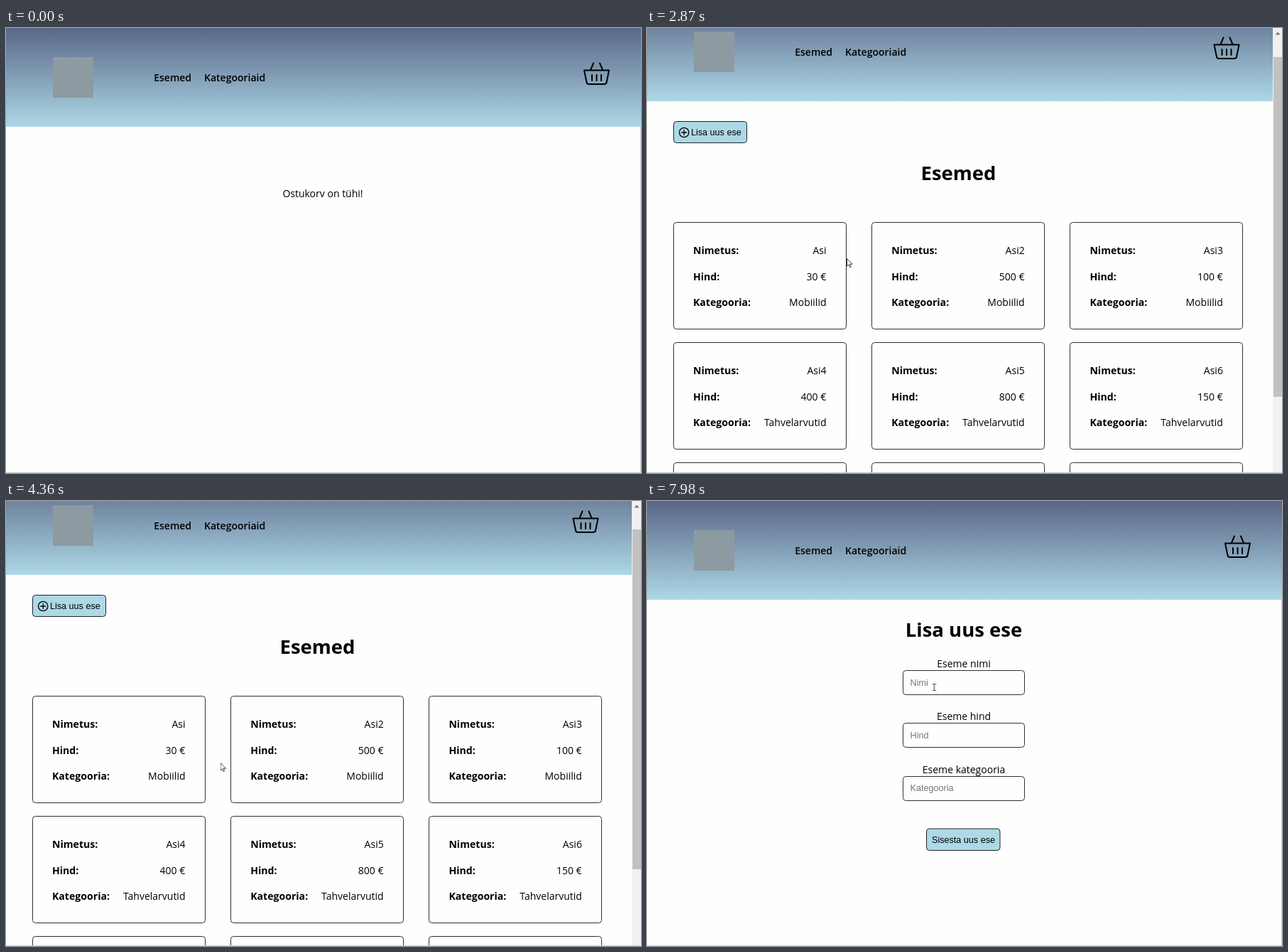
An HTML page that plays this animation: 894x626 px, repeating every 8000 ms.

```html
<!DOCTYPE html>
<html lang="et">
<head>
<meta charset="utf-8">
<title>Esemed</title>
<style>
html, body { margin: 0; width: 100%; height: 100%; overflow: hidden; background: #fefefe; }
svg { display: block; width: 894px; height: 626px; }
text { font: 14px "Open Sans", "Noto Sans", sans-serif; fill: #000; }
.b { font-weight: 700; font-size: 14.1px; }
.nav { font-weight: 600; }
.h1 { font-weight: 700; font-size: 27.5px; }
.ui { font: 12.6px "Liberation Sans", Arial, sans-serif; }
.hint { fill: #757575; }
.mid { text-anchor: middle; }
.end { text-anchor: end; }
.box { fill: none; stroke: #303030; }
.blue { fill: #add8e6; stroke: #222; }
.line { fill: none; stroke: #000; stroke-linecap: round; stroke-linejoin: round; }
.edge { fill: none; stroke: #cbcbcb; }

@property --s { syntax: "<number>"; inherits: true; initial-value: 0; }
.cart, .items, .form, .cur, .arrow, .hand, .beam { animation: 8s step-end infinite; }
.cart { animation-name: cart; }
.items { animation-name: items, scroll; }
.form { animation-name: form; }
.list { transform: translateY(calc(var(--s) * -1px)); }
.thumb { transform: translateY(calc(var(--s) * .743px)); }

@keyframes cart { 0% { visibility: visible } 24.625%, 100% { visibility: hidden } }
@keyframes items { 0% { visibility: hidden } 24.625% { visibility: visible } 76.625%, 100% { visibility: hidden } }
@keyframes form { 0% { visibility: hidden } 76.625%, 100% { visibility: visible } }
@keyframes scroll {
  0% { --s: 0 } 35.875% { --s: 36 } 36.75% { --s: 84 } 37.625% { --s: 130 }
  38.625% { --s: 172 } 39.6% { --s: 190 } 40.6% { --s: 197 }
  52% { --s: 193 } 53.3% { --s: 110 } 54.5% { --s: 35 } 55.4% { --s: 8 } 56.3%, 100% { --s: 0 }
}

/* Buttons grow and turn white under the pointer */
.btn { transform-box: fill-box; transform-origin: center; animation: 8s linear infinite; }
.lit { fill: #fbfbfb; stroke: #222; animation: 8s linear infinite; }
.add .btn { animation-name: addGrow; }
.add .lit { animation-name: addLit; }
.send .btn { animation-name: sendGrow; }
.send .lit { animation-name: sendLit; }
@keyframes addGrow { 0%, 65.625% { transform: scale(1) } 68.1%, 100% { transform: scale(1.05) } }
@keyframes addLit { 0%, 65.625% { opacity: 0 } 68.1%, 100% { opacity: 1 } }
@keyframes sendGrow { 0%, 89.9% { transform: scale(1) } 91.9%, 93.5% { transform: scale(1.05) } 95.4%, 100% { transform: scale(1) } }
@keyframes sendLit { 0%, 89.9% { opacity: 0 } 91.9%, 93.5% { opacity: 1 } 95.4%, 100% { opacity: 0 } }

/* Pointer path, sampled about every 70 ms */
.cur { animation-name: move; }
@keyframes move {
  0%, 3.875% { transform: translate(767px, 505px); animation-timing-function: steps(3) }
  6.5% { transform: translate(640px, 395px); animation-timing-function: steps(3) }
  9.25% { transform: translate(400px, 230px); animation-timing-function: steps(3) }
  11.625% { transform: translate(260px, 125px); animation-timing-function: steps(2) }
  13.375% { transform: translate(206px, 92px); animation-timing-function: steps(3) }
  16% { transform: translate(150px, 80px); animation-timing-function: steps(2) }
  18% { transform: translate(119px, 70px); animation-timing-function: steps(3) }
  20.75% { transform: translate(180px, 60px); animation-timing-function: steps(3) }
  23.625% { transform: translate(231px, 66px) }
  27.125% { transform: translate(222px, 110px); animation-timing-function: steps(3) }
  29.75% { transform: translate(201px, 248px); animation-timing-function: steps(7) }
  35.875% { transform: translate(281px, 324px); animation-timing-function: steps(2) }
  37.625% { transform: translate(284px, 330px); animation-timing-function: steps(6) }
  43.625% { transform: translate(294px, 345px); animation-timing-function: steps(4) }
  47.5% { transform: translate(300px, 363px) }
  48.375%, 56% { transform: translate(301.5px, 368px); animation-timing-function: steps(2) }
  57.75% { transform: translate(270px, 340px); animation-timing-function: steps(4) }
  61.375% { transform: translate(160px, 259px); animation-timing-function: steps(5) }
  65.625% { transform: translate(120px, 198px); animation-timing-function: steps(6) }
  70.875% { transform: translate(102px, 190px) }
  82.375% { transform: translate(115px, 200px); animation-timing-function: steps(4) }
  85.875% { transform: translate(250px, 330px); animation-timing-function: steps(4) }
  89.375% { transform: translate(400px, 455px); animation-timing-function: steps(3) }
  92% { transform: translate(440px, 478px) }
  92.875% { transform: translate(440px, 474px); animation-timing-function: steps(3) }
  95.5% { transform: translate(425px, 400px); animation-timing-function: steps(3) }
  98% { transform: translate(410px, 300px); animation-timing-function: steps(2) }
  99.7%, 100% { transform: translate(404.5px, 262px) }
}
.arrow { animation-name: arrow; }
.hand { animation-name: hand; }
.beam { animation-name: beam; }
@keyframes arrow {
  0%, 22.375%, 65.625%, 89.9%, 95.5%, 97.1%, 99.7%, 100% { visibility: hidden }
  3.875%, 27.125%, 77.375%, 93.5%, 96.35%, 97.95% { visibility: visible }
}
@keyframes hand {
  0%, 27.125%, 77.375%, 93.5%, 100% { visibility: hidden }
  22.375%, 65.625%, 89.9% { visibility: visible }
}
@keyframes beam {
  0%, 96.35%, 97.95% { visibility: hidden }
  95.5%, 97.1%, 99.7%, 100% { visibility: visible }
}
</style>
</head>
<body>
<svg viewBox="0 0 894 626">
  <defs>
    <linearGradient id="sky" gradientUnits="userSpaceOnUse" x1="0" y1="0" x2="0" y2="139">
      <stop stop-color="#596787"/><stop offset="1" stop-color="#add8e6"/>
    </linearGradient>
    <g id="nav">
      <rect x="66" y="41" width="57" height="57" fill="#8d9aa2"/>
      <text class="nav" x="208.2" y="75">Esemed</text>
      <text class="nav" x="279" y="75">Kategooriaid</text>
    </g>
    <g id="basket" class="line" stroke-width="2">
      <path d="M814 59.5H849L845.5 76.5Q845 79 842 79H821Q818 79 817.5 76.5Z"/>
      <path d="M827 49.5L823 59M836 49.5L840 59M825 66V74M831.5 66V74M838 66V74"/>
    </g>
  </defs>

  <rect width="894" height="626" fill="#fefefe"/>
  <path class="edge" d="M893.5 139V626"/>
  <rect width="894" height="139" fill="url(#sky)"/>
  <use href="#nav"/>
  <use href="#basket"/>

  <g class="cart"><text class="mid" x="446" y="238">Ostukorv on tühi!</text></g>

  <g class="items">
    <rect width="894" height="626" fill="#fefefe"/>
    <g class="list" id="list">
      <rect width="881" height="139" fill="url(#sky)"/>
      <use href="#nav"/>
      <use href="#basket" x="-15.5"/>
      <g class="add"><g class="btn">
        <rect class="blue" x="37.5" y="167.5" width="103" height="30" rx="4"/>
        <rect class="lit" x="37.5" y="167.5" width="103" height="30" rx="4"/>
        <circle class="line" cx="52.2" cy="183" r="6.7" stroke-width="1.3"/>
        <path class="line" stroke-width="1.3" d="M48.7 183H55.7M52.2 179.5V186.5"/>
        <text class="ui" x="62" y="186.5">Lisa uus ese</text>
      </g></g>
      <text class="h1 mid" x="438.5" y="250">Esemed</text>
    </g>
    <rect x="881" width="13" height="626" fill="#f1f1f1"/>
    <path d="M884.5 9.5L888 5.5L891.5 9.5Z" fill="#777"/>
    <rect class="thumb" x="882" y="14" width="12" height="478" fill="#c1c1c1"/>
  </g>

  <g class="form" id="form">
    <text class="h1 mid" x="446" y="191">Lisa uus ese</text>
    <g class="send"><g class="btn">
      <rect class="blue" x="393.5" y="461" width="103.5" height="30.5" rx="4"/>
      <rect class="lit" x="393.5" y="461" width="103.5" height="30.5" rx="4"/>
      <text class="ui mid" x="445.5" y="481">Sisesta uus ese</text>
    </g></g>
  </g>

  <path class="edge" d="M0 625.5H894"/>

  <g class="cur" stroke-linejoin="round">
    <path class="arrow" d="M.5 .5V11L2.9 8.8L4.6 12.6L6.2 11.9L4.6 8.2H8Z" fill="#fff" stroke="#222" stroke-width=".9"/>
    <path class="hand" d="M-1.2 1a1.2 1.2 0 0 1 2.4 0V5l4 .9q1.2 .4 1.1 1.8l-.6 3.4-.8 2.4h-5.4l-1.2-2.4-2.4-3.6q.4-1.5 2.9 .5z" fill="#fff" stroke="#222" stroke-width=".9"/>
    <path class="beam" d="M-2.5-4.5H-.8L0-4L.8-4.5H2.5M0-4V4M-2.5 4.5H-.8L0 4L.8 4.5H2.5" fill="none" stroke="#333"/>
  </g>
</svg>
<script>
const add = (id, html) => document.getElementById(id).insertAdjacentHTML('beforeend', html);

const prices = [30, 500, 100, 400, 800, 150, 45, 450, 150];
const groups = ['Mobiilid', 'Tahvelarvutid', 'Nutikell'];

prices.forEach((price, i) => {
  const row = Math.floor(i / 3);
  const x = 37.5 + (i % 3) * 279.2, y = 309.5 + row * 169;
  const fields = [
    ['Nimetus:', 'Asi' + (i ? i + 1 : '')],
    ['Hind:', price + ' €'],
    ['Kategooria:', groups[row]]
  ];
  const lines = fields.map(([name, value], k) => {
    const base = y + 44.5 + k * 36.5;
    return `<text class="b" x="${x + 27.5}" y="${base}">${name}</text>` +
      `<text class="end" x="${x + 215}" y="${base}">${value}</text>`;
  });
  add('list', `<rect class="box" x="${Math.floor(x) + .5}" y="${y}" width="243" height="150" rx="4"/>` + lines.join(''));
});

['Nimi', 'Hind', 'Kategooria'].forEach((name, i) => {
  const y = 238.5 + i * 74.3;
  add('form', `<text class="mid" x="446" y="${y - 4.5}">Eseme ${name.toLowerCase()}</text>
    <rect class="box" x="360.5" y="${Math.floor(y) + .5}" width="171" height="34" rx="4"/>
    <text class="ui hint" x="370.6" y="${y + 21.3}">${name}</text>`);
});
</script>
</body>
</html>
```
